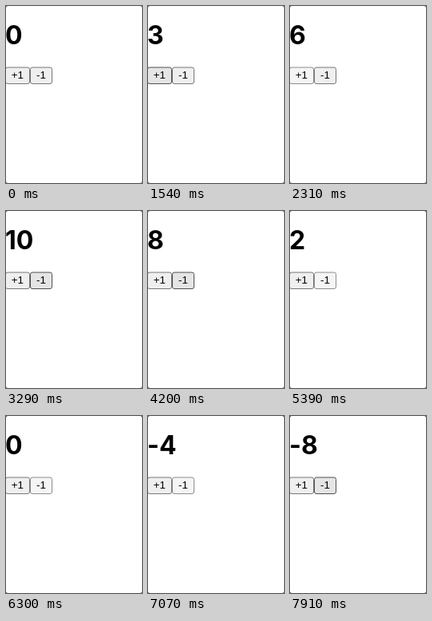
Recreate the animation shown at these times as an HTML page with a canvas. Size 170x222 px, loop 8000 ms.

```html
<!DOCTYPE html>
<html lang="en">
<head>
<meta charset="utf-8">
<title>Counter</title>
<style>
  html, body { margin: 0; width: 100%; height: 100%; overflow: hidden; background: #fff; }
  canvas { display: block; width: 170px; height: 222px; }
  h1 {
    position: absolute; left: -1px; top: 17px; margin: 0;
    font: 700 32px/39px Inter, sans-serif;
    font-optical-sizing: none;
    font-feature-settings: "calt" 0;
    white-space: nowrap; color: #000;
  }
</style>
</head>
<body>
<canvas id="stage"></canvas>
<h1 id="count">0</h1>
<script>
const W = 170, H = 222, LOOP = 8000, TICK = 70;
const canvas = document.getElementById('stage');
const heading = document.getElementById('count');
const ctx = canvas.getContext('2d');
const dpr = window.devicePixelRatio || 1;
canvas.width = W * dpr;
canvas.height = H * dpr;

// Mouse presses in ticks; a press lasts one tick unless it is held for two.
const plus = [15, 18, 21, 24, 27, 30, 33, 37, 40, 43];
const minus = [55, 58, 61, 63, 66, 69, 72, 75, 77, 80, 90, 93, 95, 98, 100, 103, 105, 112];
const held = new Set([33, 90, 95, 100, 105]);
const HOVER_PLUS = 10, HOVER_MINUS = 47;

const STYLES = {
  idle: { fill: '#efefef', line: '#767676' },
  hover: { fill: '#e5e5e5', line: '#4f4f4f' },
  active: { fill: '#f5f5f5', line: '#8d8d8d' }
};

const release = p => p + (held.has(p) ? 2 : 1);
const clicks = (list, tick) => list.filter(p => release(p) <= tick).length;
const pressed = (list, tick) => list.some(p => p <= tick && tick < release(p));

function state(list, hovered, tick) {
  if (!hovered) return 'idle';
  return pressed(list, tick) ? 'active' : 'hover';
}

function box(x, y, w, h, r) {
  ctx.beginPath();
  ctx.roundRect(x, y, w, h, r);
}

function button(x, w, label, textX, style) {
  box(x + 0.5, 77, w - 1, 20.5, 2.5);
  ctx.fillStyle = style.fill;
  ctx.fill();
  ctx.strokeStyle = style.line;
  ctx.lineWidth = 1;
  ctx.stroke();
  ctx.fillStyle = '#000';
  ctx.font = '13.333px "Liberation Sans", Arial, sans-serif';
  ctx.fillText(label, textX, 91);
}

function draw(time) {
  const tick = Math.floor(time / TICK + 1e-6);
  const count = String(clicks(plus, tick) - clicks(minus, tick));
  const onPlus = tick >= HOVER_PLUS && tick < HOVER_MINUS;
  const onMinus = tick >= HOVER_MINUS;

  ctx.setTransform(dpr, 0, 0, dpr, 0, 0);
  ctx.fillStyle = '#444';
  ctx.fillRect(0, 0, W, H);
  box(0, 0, W, H, 2.5);
  ctx.fillStyle = '#fff';
  ctx.fill();

  if (heading.textContent !== count) heading.textContent = count;

  button(-1, 31, '+1', 6.7, STYLES[state(plus, onPlus, tick)]);
  button(30, 28, '-1', 38, STYLES[state(minus, onMinus, tick)]);
}

const start = performance.now();
function loop() {
  draw((performance.now() - start) % LOOP);
  requestAnimationFrame(loop);
}
loop();
</script>
</body>
</html>
```
